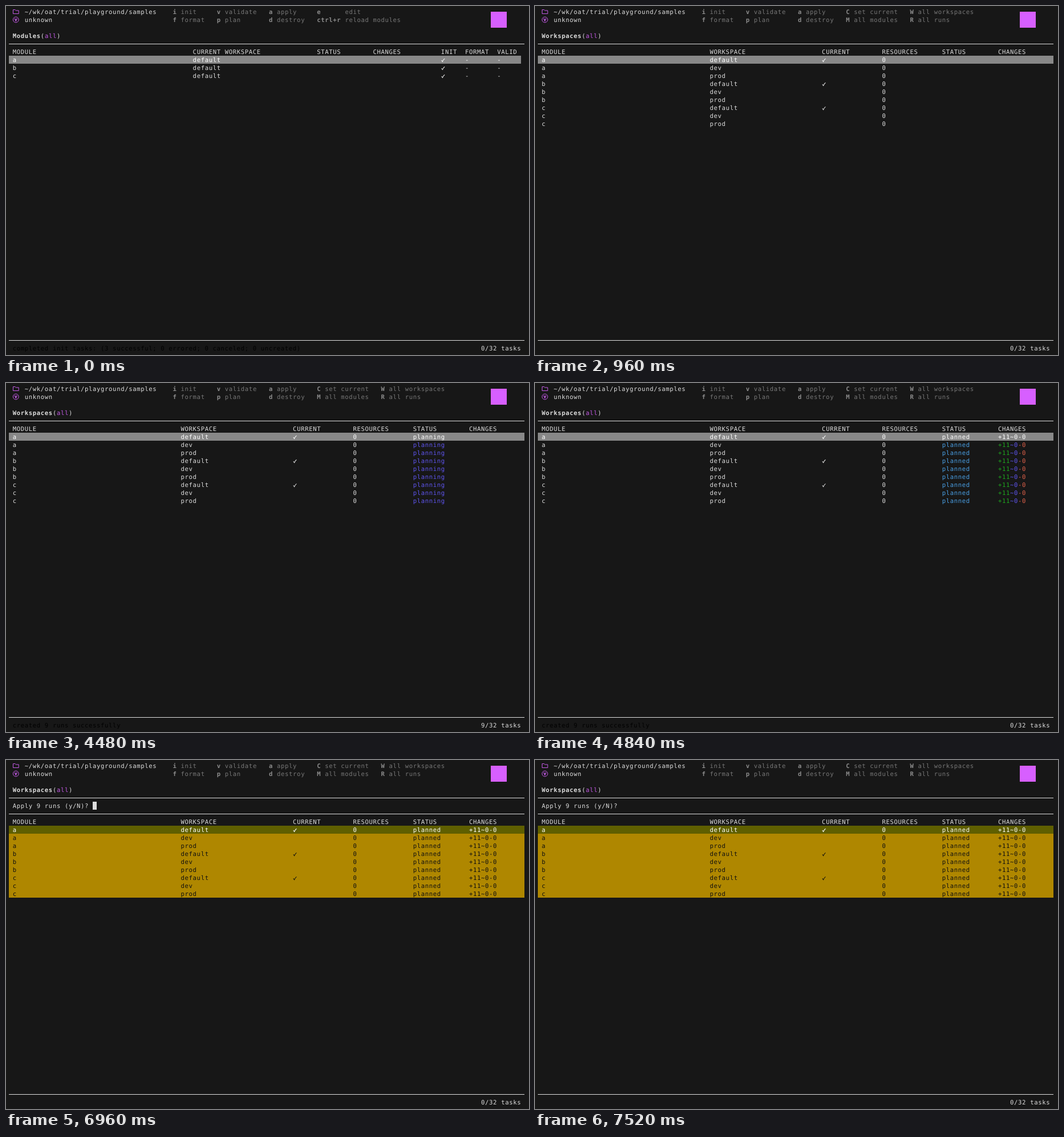
Write an HTML page that moves like this. It is 917 by 611 pixels and loops after 8000 ms.

```html
<!DOCTYPE html>
<html lang="en">
<head>
<meta charset="utf-8">
<title>Terminal workspaces</title>
<style>
html, body { margin: 0; width: 100%; height: 100%; overflow: hidden; background: #171717; }
svg { display: block; width: 100vw; height: 100vh; }
text {
  font: 10.6px "DejaVu Sans Mono", "Noto Sans Mono", monospace;
  letter-spacing: .638px;
  white-space: pre;
  text-rendering: geometricPrecision;
}
.bold { font-weight: bold; }
</style>
</head>
<body>
<svg id="stage" viewBox="0 0 917 611"></svg>
<script>
const LOOP = 8000;
const FG = '#dddddd', WHITE = '#ffffff', DIM = '#777777', KEY = '#8c8c8c', INK = '#101010';
const PURPLE = '#d75fff', ACCENT = '#c45ae6', GREY = '#888888', OLIVE = '#5f5f00', GOLD = '#af8700';
const PLANNED = '#4aa0e6', GREEN = '#1ea51e', BLUE = '#5f55f0', RED = '#e0614a';

const stage = document.getElementById('stage');

// The screen is a grid of character cells.
const colX = col => 4.7 + col * 7.02;
const rowY = row => 3.1 + row * 14.03;

const write = (col, row, str, fill = FG, cls = '') =>
  `<text x="${colX(col).toFixed(2)}" y="${(rowY(row) + 10.8).toFixed(2)}" fill="${fill}" class="${cls}">${str}</text>`;

const box = (x, y, w, h, fill) =>
  `<rect x="${x}" y="${y}" width="${w}" height="${h}" fill="${fill}"/>`;

const rule = row => box(5, Math.round(rowY(row) + 7), 904, 1, FG);

function band(row, count, right, fill) {
  const top = Math.round(rowY(row));
  return box(5, top, right - 5, Math.floor(rowY(row + count)) - top, fill);
}

const tick = (col, row, color) =>
  `<path d="M${colX(col) + .8} ${rowY(row) + 7.8}l1.7 2.3q1.4-3.4 3.8-5.2" fill="none" stroke="${color}" stroke-width="1.1"/>`;

const cells = (list, row) => list.map(([col, str]) => write(col, row, str)).join('');

const shortcuts = list => list.map(([row, col, key, label, labelCol = col + 2]) =>
  write(col, row, key, KEY, 'bold') + write(labelCol, row, label, DIM)).join('');

const COMMON_KEYS = [
  [0, 41, 'i', 'init'], [1, 41, 'f', 'format'],
  [0, 52, 'v', 'validate'], [1, 52, 'p', 'plan'],
  [0, 65, 'a', 'apply'], [1, 65, 'd', 'destroy']
];
const MODULE_KEYS = [[0, 77, 'e', 'edit', 84], [1, 77, 'ctrl+r', 'reload modules', 84]];
const WORKSPACE_KEYS = [
  [0, 77, 'C', 'set current'], [1, 77, 'M', 'all modules'],
  [0, 93, 'W', 'all workspaces'], [1, 93, 'R', 'all runs']
];

function chrome(title, keys, message, tasks) {
  const end = title.length + 1;
  return box(0, 0, 917, 611, '#171717') +
    `<g fill="none" stroke="${ACCENT}">
      <path d="M12.5 13.5v-7h3.6l1.2 1.4h4.9v5.6z"/>
      <circle cx="17.3" cy="24" r="4.9"/>
      <path d="M15.4 21.8l1.9 4.2 1.9-4.2" stroke-width="1.5"/>
    </g>` +
    write(4, 0, '~/wk/oat/trial/playground/samples') + write(4, 1, 'unknown') +
    shortcuts([...COMMON_KEYS, ...keys]) +
    box(850, 10, 28, 28, PURPLE) +
    write(1, 3, title, FG, 'bold') + write(end, 3, '(') +
    write(end + 1, 3, 'all', ACCENT) + write(end + 4, 3, ')') +
    rule(4) + rule(41) +
    write(1, 42, message, '#000000') + write(118, 42, tasks + '/32 tasks');
}

function modulesView() {
  const head = [[1, 'MODULE'], [46, 'CURRENT WORKSPACE'], [77, 'STATUS'], [91, 'CHANGES'],
    [108, 'INIT'], [114, 'FORMAT'], [122, 'VALID']];
  const message = 'completed init tasks: (3 successful; 0 errored; 0 canceled; 0 uncreated)';
  let out = chrome('Modules', MODULE_KEYS, message, 0) + cells(head, 5) + band(6, 1, 903, GREY);
  ['a', 'b', 'c'].forEach((name, i) => {
    const row = 6 + i, color = i ? FG : WHITE;
    out += write(1, row, name, color) + write(46, row, 'default', color) + tick(108, row, color) +
      write(114, row, '-', color) + write(122, row, '-', color);
  });
  return out;
}

function workspacesView({ selected, planned, planning, message = '', tasks = 0, prompt, cursor }) {
  const top = prompt ? 7 : 5;
  const head = [[1, 'MODULE'], [43, 'WORKSPACE'], [71, 'CURRENT'], [86, 'RESOURCES'],
    [101, 'STATUS'], [115, 'CHANGES']];
  let out = chrome('Workspaces', WORKSPACE_KEYS, message, tasks);
  if (prompt) out += write(1, 5, 'Apply 9 runs (y/N)?') + rule(6);
  if (cursor) out += box(152, 73, 7, 14, FG);
  out += cells(head, top);
  if (selected) out += band(top + 1, 9, 909, GOLD);
  out += band(top + 1, 1, 909, selected ? OLIVE : GREY);

  for (let i = 0; i < 9; i++) {
    const row = top + 1 + i;
    const color = i === 0 ? WHITE : selected ? INK : FG;
    const tint = hue => i === 0 || selected ? color : hue;
    out += write(1, row, 'abc'[Math.floor(i / 3)], color) +
      write(43, row, ['default', 'dev', 'prod'][i % 3], color) + write(86, row, '0', color);
    if (i % 3 === 0) out += tick(71, row, color);
    if (i < planned) {
      out += write(101, row, 'planned', tint(PLANNED)) + write(115, row, '+11', tint(GREEN)) +
        write(118, row, '~0', tint(BLUE)) + write(120, row, '-0', tint(RED));
    } else if (planning) {
      out += write(101, row, 'planning', tint(BLUE));
    }
  }
  return out;
}

const created = 'created 9 runs successfully';
const scenes = [
  [0, modulesView],
  [960, () => workspacesView({})],
  [3960, () => workspacesView({ selected: true })],
  [4480, () => workspacesView({ planning: true, message: created, tasks: 9 })],
  [4800, () => workspacesView({ planning: true, planned: 5, message: created, tasks: 4 })],
  [4840, () => workspacesView({ planned: 9, message: created })],
  [6480, () => workspacesView({ selected: true, planned: 9 })],
  [6960, () => workspacesView({ selected: true, planned: 9, prompt: true, cursor: true })],
  [7520, () => workspacesView({ selected: true, planned: 9, prompt: true })]
];

let shown;
function render(time) {
  const scene = scenes.findLast(([start]) => start <= time);
  if (scene === shown) return;
  shown = scene;
  stage.innerHTML = scene[1]();
}

const begin = performance.now();
function loop() {
  render((performance.now() - begin) % LOOP);
  requestAnimationFrame(loop);
}
loop();
</script>
</body>
</html>
```
